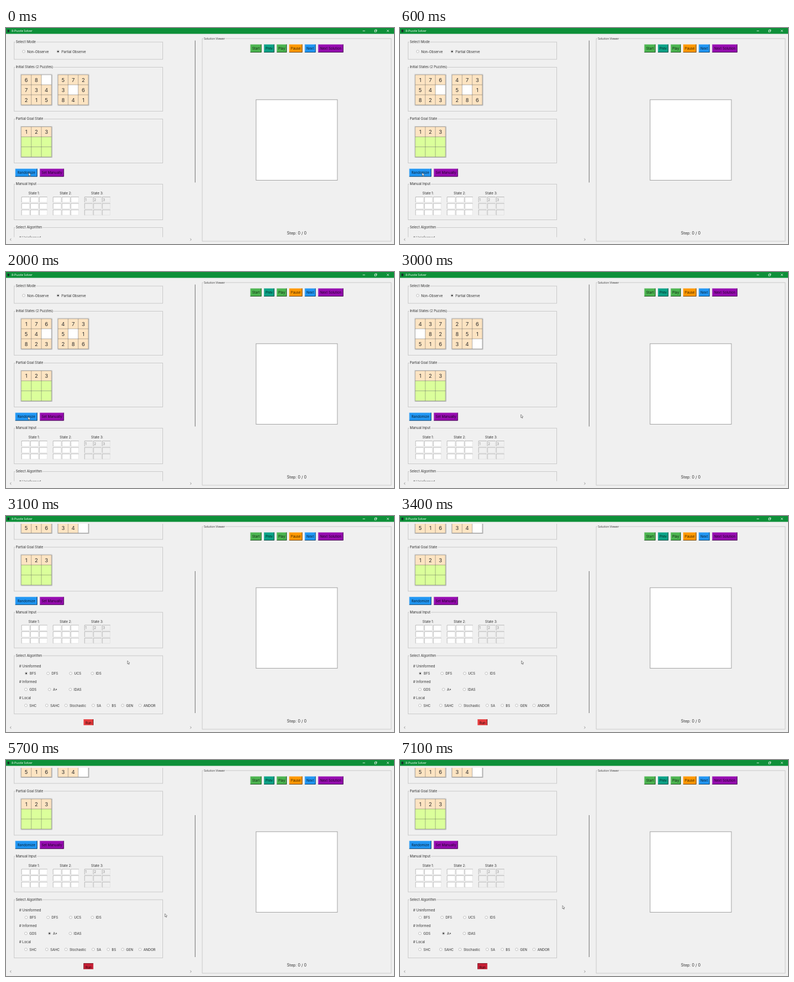
An HTML page with a canvas that plays this animation: 692 px wide and 388 px high, repeating every 8 s.

```html
<!DOCTYPE html>
<html lang="en">
<head>
<meta charset="utf-8">
<title>8-Puzzle Solver</title>
<style>
html, body { margin: 0; width: 100%; height: 100%; overflow: hidden; background: #f0f0f0; }
canvas { display: block; width: 692px; height: 388px; }
</style>
</head>
<body>
<canvas id="stage"></canvas>
<script>
const W = 692, H = 388, LOOP = 8000, STEP = 100;
const canvas = document.getElementById('stage');
const ctx = canvas.getContext('2d');
const dpr = window.devicePixelRatio || 1;
canvas.width = W * dpr;
canvas.height = H * dpr;

const UI = 'Inter, Roboto, sans-serif';
const SYS = '"Open Sans", "Noto Sans", sans-serif';
const BG = '#f0f0f0', INK = '#303030', TILE = '#fde4c2', LIME = '#dbff9b';
const BLUE = '#2196f3', PURPLE = '#960cb0', GREEN = '#4cb450';
const SCROLL = 107.5;

// Puzzle pairs shown from the given moment on; 0 is the blank
const deals = [
  [0, '680734215', '572306841'],
  [300, '176540823', '473501286'],
  [2200, '437082516', '276851340']
];
const scrollAt = 3100, pickAt = 4300, runAt = 5100;

// Pointer tip: time, x, y
const path = [
  [0, 40.5, 260], [100, 39.5, 260], [2700, 39.5, 260], [3000, 215.6, 256],
  [3100, 216.6, 260], [3400, 216.6, 260], [4100, 77, 310], [4500, 77, 310],
  [4900, 147, 369], [5600, 147, 369], [5700, 283.4, 276], [6100, 289, 268],
  [6200, 289, 268], [6400, 289.8, 261.5], [LOOP, 289.8, 261.5]
];

const algorithms = [
  ['# Uninformed', 377, [['BFS', 36], ['DFS', 75], ['UCS', 115.3], ['IDS', 154]]],
  ['# Informed', 405.8, [['GDS', 35.5], ['A*', 77.5], ['IDAS', 114.7]]],
  ['# Local', 434.5, [['SHC', 35.5], ['SAHC', 72.7], ['Stochastic', 107], ['SA', 155.5],
    ['BS', 182.4], ['GEN', 208], ['ANDOR', 239]]]
];

function fill(x, y, w, h, color) {
  ctx.fillStyle = color;
  ctx.fillRect(x, y, w, h);
}

function box(x, y, w, h, color, width = 1) {
  ctx.strokeStyle = color;
  ctx.lineWidth = width;
  ctx.strokeRect(x, y, w, h);
}

function line(color, width, ...pts) {
  ctx.strokeStyle = color;
  ctx.lineWidth = width;
  ctx.beginPath();
  pts.forEach(([x, y]) => ctx.lineTo(x, y));
  ctx.stroke();
}

function text(str, x, y, size = 6, align = 'left', color = INK, family = UI) {
  ctx.font = `${size}px ${family}`;
  ctx.textAlign = align;
  ctx.textBaseline = 'alphabetic';
  ctx.fillStyle = color;
  ctx.fillText(str, x, y + size * 0.36);
}

function group(label, x, y, w, h, size = 6, family = UI) {
  box(x + 0.5, y + 0.5, w, h, '#cacaca');
  ctx.font = `${size}px ${family}`;
  fill(x + 2.5, y - 2, ctx.measureText(label).width + 2, 5, BG);
  text(label, x + 3.5, y + 0.2, size, 'left', INK, family);
}

function button(label, x, y, w, h, color, down = false) {
  fill(x, y, w, h, color);
  const light = 'rgba(255,255,255,.25)', dark = 'rgba(0,0,0,.55)';
  line(down ? dark : light, 0.7, [x + 0.4, y + h], [x + 0.4, y + 0.4], [x + w, y + 0.4]);
  line(down ? light : dark, 1, [x, y + h - 0.5], [x + w - 0.5, y + h - 0.5], [x + w - 0.5, y]);
  text(label, x + w / 2, y + h / 2 + (down ? 0.8 : 0), 6, 'center', 'rgba(0,0,0,.78)');
}

function radio(label, x, y, on) {
  ctx.beginPath();
  ctx.arc(x, y, 2.3, 0, 7);
  ctx.fillStyle = '#fff';
  ctx.fill();
  ctx.strokeStyle = '#a0a0a0';
  ctx.lineWidth = 0.6;
  ctx.stroke();
  if (on) {
    ctx.beginPath();
    ctx.arc(x, y, 1.2, 0, 7);
    ctx.fillStyle = '#111';
    ctx.fill();
  }
  text(label, x + 6.2, y + 0.4);
}

function board(x, y, cells) {
  box(x - 0.5, y - 0.5, 56, 56, '#d6d6d6');
  line('#bababa', 1, [x + 0.5, y + 55.5], [x + 55.5, y + 55.5], [x + 55.5, y + 0.5]);
  [...cells].forEach((c, i) => {
    const cx = x + 0.5 + (i % 3) * 18, cy = y + 0.5 + Math.floor(i / 3) * 18;
    fill(cx, cy, 18, 18, c === '0' ? '#fff' : c === '-' ? LIME : TILE);
    if (c > '0') text(c, cx + 9, cy + 9.2, 9.3, 'center');
  });
  for (let i = 0; i < 4; i++) {
    const d = 0.5 + i * 18;
    line('rgba(70,70,70,.5)', 0.8, [x + d, y + 0.5], [x + d, y + 54.5]);
    line('rgba(70,70,70,.5)', 0.8, [x + 0.5, y + d], [x + 54.5, y + d]);
  }
}

function entries(label, x, y, locked) {
  text(label, x + 23, y - 5.8, 6, 'center');
  for (let i = 0; i < 9; i++) {
    const ex = x + (i % 3) * 15.8, ey = y + Math.floor(i / 3) * 11.6;
    fill(ex, ey, 14.6, 10.2, locked ? BG : '#fff');
    line('#e0e0e0', 0.7, [ex, ey + 10], [ex + 14.4, ey + 10], [ex + 14.4, ey]);
    line('#b0b0b0', 0.9, [ex + 0.5, ey + 10], [ex + 0.5, ey + 0.5], [ex + 14.6, ey + 0.5]);
    if (locked && i < 3) text(String(i + 1), ex + 1.5, ey + 5.3, 6.3, 'left', '#8c8c8c');
  }
}

function leftPane(t) {
  const deal = deals.filter(d => d[0] <= t).pop();
  const scrolled = t >= scrollAt;
  ctx.save();
  ctx.beginPath();
  ctx.rect(0, 14, 335, 361.7);
  ctx.clip();
  if (scrolled) ctx.translate(0, -SCROLL);

  group('Select Mode', 14, 24.7, 265, 31);
  radio('Non-Observe', 31.5, 42.2, false);
  radio('Partial Observe', 92.8, 42.2, true);

  group('Initial States (2 Puzzles)', 14, 70, 265, 79, 5.9);
  board(26.6, 83.5, deal[1]);
  board(92.3, 83.5, deal[2]);

  group('Partial Goal State', 14, 163, 265, 79);
  board(26.6, 177, '123------');

  button('Randomize', 16.5, 252.7, 39.5, 14.5, BLUE);
  button('Set Manually', 60.3, 252.7, 43, 14.5, PURPLE);

  group('Manual Input', 14, 280, 265, 64);
  entries('State 1:', 27.3, 303, false);
  entries('State 2:', 83.5, 303, false);
  entries('State 3:', 139.7, 303, true);

  group('Select Algorithm', 14, 358, 265, 104.5);
  const picked = t >= pickAt ? 'A*' : 'BFS';
  for (const [title, y, items] of algorithms) {
    text(title, 23.5, y);
    for (const [name, x] of items) radio(name, x, y + 13.2, name === picked);
  }
  const running = t >= runAt;
  button('Run', 138.3, 472.5, 17.7, 14.5, running ? '#c61f35' : '#e53a3c', running);
  ctx.restore();

  const top = scrolled ? 99 : 22.5;
  fill(336.8, top, 1.2, 255, '#858585');
  line('#8a8a8a', 0.9, [9.3, 378.2], [7.3, 380], [9.3, 381.8]);
  line('#8a8a8a', 0.9, [328.5, 378.2], [330.5, 380], [328.5, 381.8]);
}

function viewer() {
  group('Solution Viewer', 349.5, 18.5, 337, 364, 5.2, SYS);
  [['Start', 435.7, 20, GREEN], ['Prev', 460, 18.6, '#0ba287'], ['Play', 482.8, 18, GREEN],
   ['Pause', 505, 23.6, '#ff9800'], ['Next', 532.8, 19.6, BLUE], ['Next Solution', 556.7, 45, PURPLE]]
    .forEach(([label, x, w, color]) => button(label, x, 29.4, w, 14.6, color));
  fill(446, 129, 145, 144.5, '#fff');
  box(446, 128.8, 145, 144.7, '#a2a2a2');
  text('Step: 0 / 0', 518.5, 368, 7.1, 'center');
}

function titleBar() {
  fill(0, 0, W, 10.5, '#0e9039');
  fill(2.5, 3, 3.5, 4.5, '#14352a');
  text('8-Puzzle Solver', 10, 5.2, 5.3, 'left', '#fff', SYS);
  line('#fff', 0.8, [636.3, 5.2], [640.3, 5.2]);
  box(657.3, 4, 3, 3, '#fff', 0.7);
  line('#fff', 0.6, [658.4, 3], [661.3, 3], [661.3, 6]);
  line('#fff', 0.7, [679.2, 3.2], [683, 7]);
  line('#fff', 0.7, [683, 3.2], [679.2, 7]);
}

function pointer(t) {
  const i = path.findIndex(p => p[0] > t);
  const [t0, x0, y0] = path[i - 1], [t1, x1, y1] = path[i];
  const u = (t - t0) / (t1 - t0), k = u * u * (3 - 2 * u);
  ctx.save();
  ctx.translate(x0 + (x1 - x0) * k, y0 + (y1 - y0) * k);
  ctx.beginPath();
  [[0, 0], [0, 5.6], [1.3, 4.5], [2.2, 6.6], [3.1, 6.2], [2.2, 4.2], [4, 4]]
    .forEach(([x, y]) => ctx.lineTo(x, y));
  ctx.closePath();
  ctx.fillStyle = '#fff';
  ctx.fill();
  ctx.strokeStyle = '#444';
  ctx.lineWidth = 0.6;
  ctx.stroke();
  ctx.restore();
}

function draw(t) {
  ctx.setTransform(dpr, 0, 0, dpr, 0, 0);
  fill(0, 0, W, H, BG);
  leftPane(t);
  viewer();
  titleBar();
  pointer(t);
}

const start = performance.now();
function tick() {
  const t = (performance.now() - start) % LOOP;
  draw(Math.floor(t / STEP) * STEP);
  requestAnimationFrame(tick);
}
tick();
</script>
</body>
</html>
```
